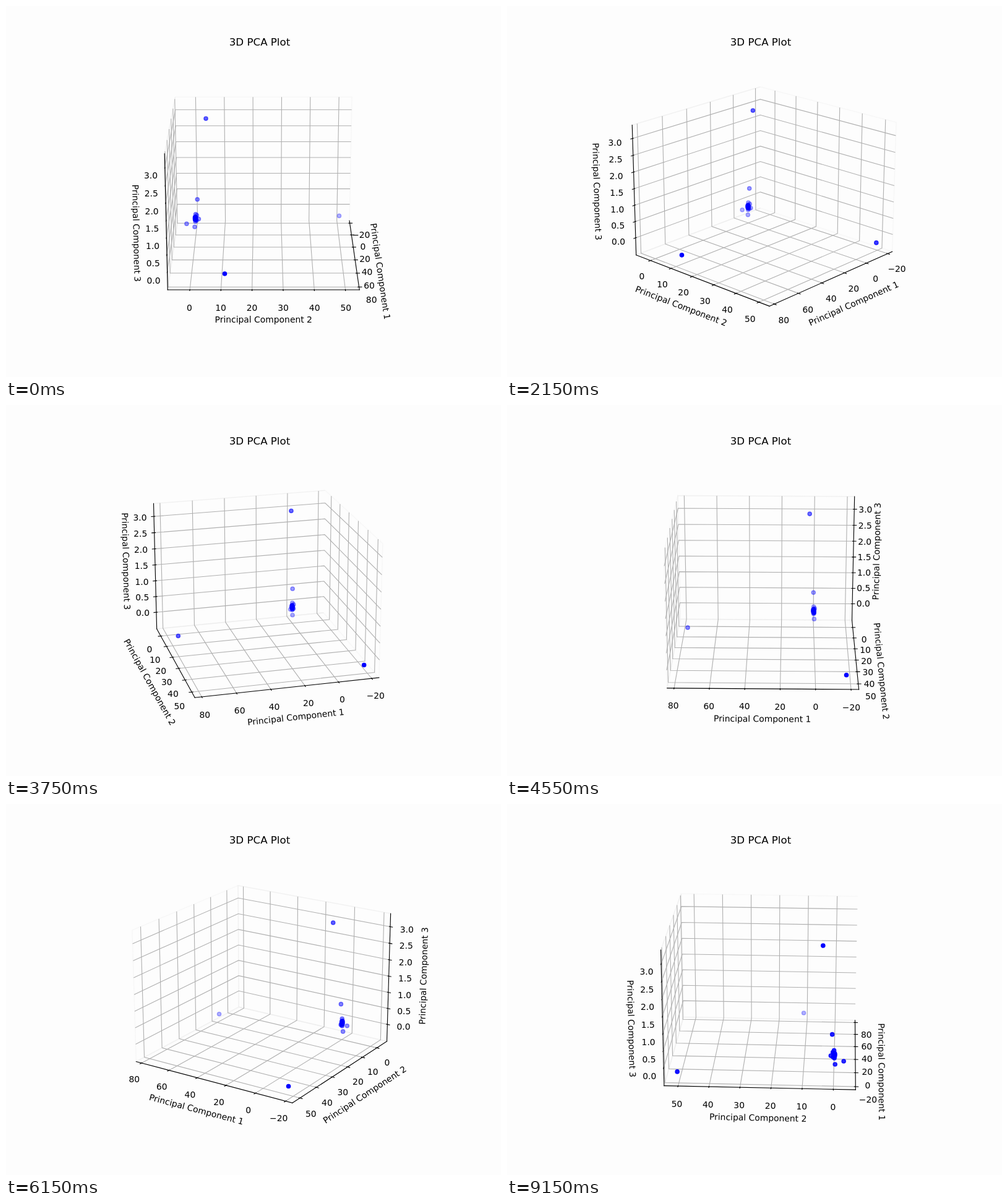
Animation, 800 px wide and 600 px high, one loop 9200 ms. Source, as an HTML page:

```html
<!DOCTYPE html>
<html lang="en">
<head>
<meta charset="utf-8">
<title>3D PCA Plot</title>
<style>
  html, body { margin: 0; width: 100%; height: 100%; overflow: hidden; background: #fdfdfd; }
  svg { display: block; width: 800px; height: 600px; font: 13.889px "DejaVu Sans", sans-serif; text-anchor: middle; }
  .title { font-size: 16.667px; }
  polyline { fill: none; }
  .grid { stroke: #b0b0b0; stroke-width: 1.11; }
  .axis { stroke: #000; stroke-width: 1.11; stroke-linecap: square; }
  .tick { stroke: #000; stroke-width: 1.11; }
  .pane { stroke-width: 1.39; stroke-opacity: .5; }
  circle { fill: #00f; stroke: #00f; stroke-width: 1.39; }
</style>
</head>
<body>
<svg viewBox="0 0 800 600">
  <text class="title" x="410" y="64">3D PCA Plot</text>
  <g id="plot"></g>
</svg>
<script>
const STEP_MS = 50, STEPS = 184;
const ELEV = 20 * Math.PI / 180, DISTANCE = 10;
const SCALE = 2497.3, CENTER_X = 416.24, CENTER_Y = 296.76;
const HALF = [0.595238, 0.595238, 0.446429];
const DELTA = HALF.map(h => h * 0.16);
const TICK_PAD = 0.82973, LABEL_PAD = 1.80375;

// side: axis along which tick marks point; juggled: axes whose edge lies on the near wall
const axes = [
  { lo: -24.39, hi: 83.93, first: -20, step: 20, count: 6, digits: 0, side: 1, near: 1, pane: '#f2f2f2' },
  { lo: -7.12, hi: 54.51, first: 0, step: 10, count: 6, digits: 0, side: 0, near: 0, pane: '#e6e6e6' },
  { lo: -0.533, hi: 3.393, first: 0, step: 0.5, count: 7, digits: 1, side: 0, near: 0, pane: '#ececec' }
];

const toWorld = (value, i) =>
  ((value - axes[i].lo) / (axes[i].hi - axes[i].lo) * 2 - 1) * HALF[i];

const samples = [
  [3.2, 4.1, 3.143], [77.04, 11.16, -0.199], [-17.5, 50.6, -0.25],
  [-0.35, -3.2, -0.184], [-0.35, -0.39, -0.283], [0.29, 0.7, 0.6],
  [0.02, 0.02, 0.126], [-0.59, 0.4, 0.082], [-0.21, 1.05, -0.029],
  [0.02, -0.12, -0.105], [-0.07, 0.3, -0.07]
];
for (let i = 0; i < 24; i++) {
  samples.push([0.05 + 0.2 * Math.sin(i * 2.4), -0.1 + 0.13 * Math.cos(i * 1.7), 0.045 - 0.1 * i / 23]);
}
const points = samples.map(p => p.map(toWorld));

const ticks = axes.map((axis, i) => Array.from({ length: axis.count }, (_, k) => {
  const value = axis.first + k * axis.step;
  return { pos: toWorld(value, i), text: value.toFixed(axis.digits).replace('-', '\u2212') };
}));

function camera(azimuth) {
  const a = azimuth * Math.PI / 180;
  const c = Math.cos(a), s = Math.sin(a), ce = Math.cos(ELEV), se = Math.sin(ELEV);
  return ([x, y, z]) => {
    const forward = x * c + y * s;
    const depth = DISTANCE - forward * ce - z * se;
    return {
      x: CENTER_X + SCALE * (y * c - x * s) / depth,
      y: CENTER_Y - SCALE * (z * ce - forward * se) / depth,
      depth
    };
  };
}

const withValue = (p, i, value) => p.map((v, k) => k === i ? value : v);

const moveOut = (p, skip, amount) =>
  p.map((v, k) => k === skip ? v : v + Math.sign(v) * DELTA[k] * amount);

function line(kind, project, pts, extra = '') {
  const list = pts.map(project).map(q => q.x.toFixed(2) + ',' + q.y.toFixed(2)).join(' ');
  return `<polyline class="${kind}" points="${list}" ${extra}/>`;
}

function panes(project, far) {
  const [x, y, z] = HALF;
  const [fx, fy, fz] = far;
  const outlines = [
    [[fx, -y, -z], [fx, y, -z], [fx, y, z], [fx, -y, z]],
    [[-x, fy, -z], [x, fy, -z], [x, fy, z], [-x, fy, z]],
    [[-x, -y, fz], [x, -y, fz], [x, y, fz], [-x, y, fz]]
  ];
  return outlines.map((o, i) => line('pane', project, o, `stroke="${axes[i].pane}"`)).join('');
}

function grid(project, far, i) {
  const a = (i + 1) % 3, b = (i + 2) % 3;
  return ticks[i].map(t => {
    const corner = withValue(far, i, t.pos);
    return line('grid', project, [withValue(corner, a, -far[a]), corner, withValue(corner, b, -far[b])]);
  }).join('');
}

function axisParts(project, far, i) {
  const { near, side } = axes[i];
  const edge = withValue(far, near, -far[near]);
  const ends = [withValue(edge, i, -HALF[i]), withValue(edge, i, HALF[i])];
  let out = line('axis', project, ends);

  const from = project(ends[0]), to = project(ends[1]);
  let angle = Math.atan2(to.y - from.y, to.x - from.x) * 180 / Math.PI;
  if (angle >= 90) angle -= 180;
  if (angle < -90) angle += 180;
  const at = project(moveOut(withValue(edge, i, 0), i, LABEL_PAD));
  out += `<text transform="translate(${at.x.toFixed(2)} ${at.y.toFixed(2)}) rotate(${angle.toFixed(2)})" y="4">Principal Component ${i + 1}</text>`;

  const outward = Math.sign(edge[side]) * DELTA[side];
  for (const t of ticks[i]) {
    const p = withValue(edge, i, t.pos);
    out += line('tick', project, [
      withValue(p, side, p[side] - 0.1 * outward),
      withValue(p, side, p[side] + 0.2 * outward)
    ]);
    const q = project(moveOut(p, i, TICK_PAD));
    out += `<text x="${q.x.toFixed(2)}" y="${Math.round(q.y + 11)}">${t.text}</text>`;
  }
  return out;
}

function scatter(project) {
  const dots = points.map(project).sort((a, b) => b.depth - a.depth);
  const farZ = 1 / dots[0].depth, nearZ = 1 / dots[dots.length - 1].depth;
  return dots.map(d => {
    const alpha = 1 - 0.7 * (nearZ - 1 / d.depth) / (nearZ - farZ);
    return `<circle cx="${d.x.toFixed(2)}" cy="${d.y.toFixed(2)}" r="3.105" opacity="1" fill-opacity="${alpha.toFixed(3)}" stroke-opacity="${alpha.toFixed(3)}"/>`;
  }).join('');
}

const plot = document.getElementById('plot');

function draw(azimuth) {
  const project = camera(azimuth);
  const far = [azimuth > 90 ? HALF[0] : -HALF[0], azimuth > 180 ? HALF[1] : -HALF[1], -HALF[2]];
  const each = part => [0, 1, 2].map(i => part(project, far, i)).join('');
  plot.innerHTML = panes(project, far) + each(grid) + each(axisParts) + scatter(project);
}

let shown = -1;
function tick() {
  const step = Math.floor(performance.now() / STEP_MS) % STEPS;
  if (step !== shown) draw(shown = step);
  requestAnimationFrame(tick);
}
tick();
</script>
</body>
</html>
```
